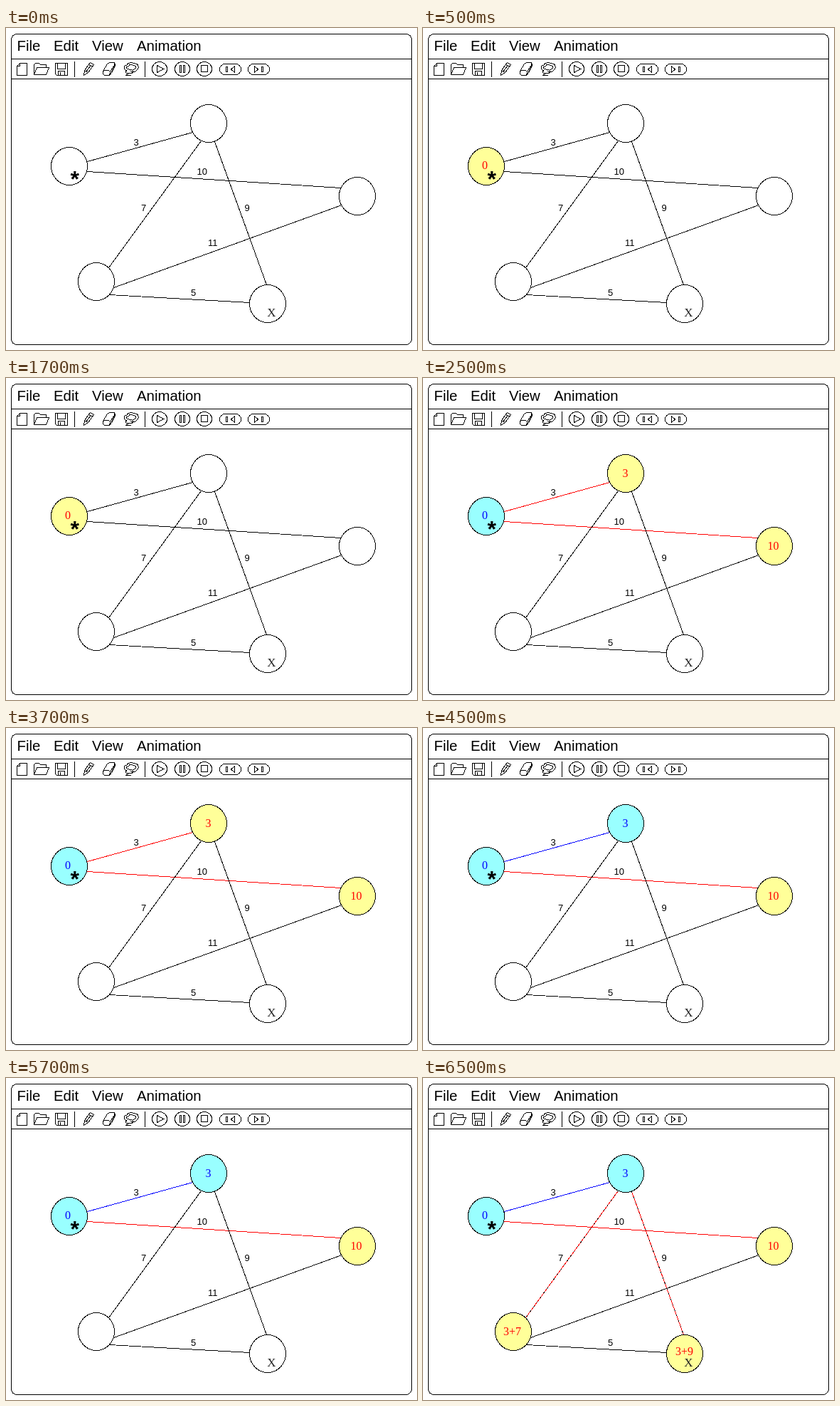
An HTML page for the animation above (8 s loop, 578 px wide and 452 px high).

```html
<!DOCTYPE html>
<html lang="en">
<head>
<meta charset="utf-8">
<title>Shortest path</title>
<style>
  html, body { margin: 0; width: 100%; height: 100%; overflow: hidden; background: #fff; }
  svg { display: block; }
  .art { fill: none; stroke: #000; stroke-width: 1; shape-rendering: crispEdges; }
  .menu { font: 20.4px "Liberation Sans", Arial, sans-serif; }
  .weight { font: 13px "Liberation Sans", Arial, sans-serif; }
  .label { font: 16px "Liberation Serif", "Times New Roman", serif; text-anchor: middle; }
  .goal { font-size: 17px; fill: #222; }
  .star { font: bold 32px "Liberation Sans", Arial, sans-serif; text-anchor: middle; }
</style>
</head>
<body>
<svg id="stage" width="578" height="452" viewBox="0 0 578 452">
  <g class="art">
    <rect x="7.5" y="8.5" width="563" height="436" rx="8"/>
    <path d="M8 43.5H570M8 71.5H570M96.5 47V69M195.5 47V69"/>
  </g>

  <g class="menu">
    <text x="15.5" y="32">File</text>
    <text x="67" y="32">Edit</text>
    <text x="121" y="32">View</text>
    <text x="184" y="32">Animation</text>
  </g>

  <g class="art">
    <!-- new, open, save -->
    <path d="M19.5 49.5H29.5V66.5H15.5V53.5ZV53.5H15.5"/>
    <path d="M39.5 65.5V51.5L41.5 49.5H46.5L48.5 51.5H56.5V55.5M39.5 65.5L43.5 55.5H60.5L56.5 65.5Z"/>
    <path d="M69.5 49.5H86.5V66.5H71.5L69.5 64.5ZM72.5 49.5V57.5H83.5V49.5M73.5 66.5V60.5H82.5V66.5M76 62V66"/>
    <!-- pencil, eraser, lasso -->
    <path d="M109.5 66.5L110.5 59.5L118.5 48.5L123.5 51.5L115.5 62.5ZM110.5 59.5L115.5 62.5M116.5 51.5L121.5 54.5M113 61L119 53M109.5 65L111.5 65.5"/>
    <path d="M136.5 60.5L142.5 50.5L145.5 48.5H152.5L153.5 52.5L148.5 62.5L145.5 66.5H138.5L136.5 64.5ZM136.5 60.5L138.5 59.5H144.5L146.5 61.5L153.5 50.5M146.5 61.5L145.5 66.5"/>
    <path d="M170 60C165 58 165 52 170 52C172 48 178 48 180 50C187 49 188 57 183 60C181 63 176 62 175 60M172 57.5C168 57 168 54 172 54C174 50 178 51 179 53C184 52 184 57 181 57.5C179 60 175 59 172 57.5M170 60C166 62 169 64 172 63C175 65 180 63 178 60M173 63L169 66.5H176"/>
    <!-- playback -->
    <ellipse cx="216" cy="57.5" rx="10.5" ry="10"/>
    <ellipse cx="248" cy="57.5" rx="10.5" ry="10"/>
    <ellipse cx="279" cy="57.5" rx="10.5" ry="10"/>
    <path d="M212.5 52.5V62.5L221.5 57.5Z"/>
    <path d="M244.5 52.5H246.5V62.5H244.5ZM249.5 52.5H251.5V62.5H249.5ZM274.5 52.5H283.5V61.5H274.5Z"/>
    <rect x="300.5" y="50.5" width="30" height="15" rx="7.5"/>
    <rect x="340.5" y="50.5" width="30" height="15" rx="7.5"/>
    <path d="M309.5 54.5H311.5V61.5H309.5ZM321.5 53.5V62.5L316.5 58ZM349.5 53.5V62.5L354.5 58ZM359.5 54.5H361.5V61.5H359.5Z"/>
  </g>

  <g id="edges" class="art"></g>
  <g id="nodes"></g>
  <text class="star" x="96.7" y="223">*</text>
  <text class="label goal" x="373.5" y="405">X</text>
</svg>
<script>
const LOOP = 8000;
const RED = "#f00", BLUE = "#00f", YELLOW = "#ff9", CYAN = "#9ff";

// open: when a node is first reached; done: when its distance is final
const nodes = [
  { x: 89, y: 194, label: "0", lx: 87, ly: 198, open: 500, done: 2500 },
  { x: 285, y: 134, label: "3", lx: 284.5, ly: 139, open: 2500, done: 4500 },
  { x: 494, y: 236, label: "10", lx: 492.5, ly: 241, open: 2500, done: Infinity },
  { x: 127, y: 356, label: "3+7", lx: 125.5, ly: 361, open: 6500, done: Infinity },
  { x: 368, y: 387, label: "3+9", lx: 367.5, ly: 389, open: 6500, done: Infinity }
];
const edges = [
  { line: [114, 187, 262, 146], weight: 3, wx: 179.5, wy: 165, open: 2500, done: 4500 },
  { line: [114, 201, 470, 224], weight: 10, wx: 268.5, wy: 206, open: 2500, done: Infinity },
  { line: [274, 158, 144, 336], weight: 7, wx: 190, wy: 257, open: 6500, done: Infinity, mixed: true },
  { line: [293, 159, 366, 360], weight: 9, wx: 335.5, wy: 257, open: 6500, done: Infinity, mixed: true },
  { line: [472, 248, 151, 364], weight: 11, wx: 284, wy: 306, open: Infinity, done: Infinity },
  { line: [145, 374, 342, 385], weight: 5, wx: 260, wy: 376, open: Infinity, done: Infinity }
];

function add(parent, tag, attrs, text = "") {
  const el = document.createElementNS("http://www.w3.org/2000/svg", tag);
  for (const key in attrs) el.setAttribute(key, attrs[key]);
  el.textContent = text;
  return parent.appendChild(el);
}

const edgeLayer = document.getElementById("edges");
const nodeLayer = document.getElementById("nodes");

for (const e of edges) {
  const [x1, y1, x2, y2] = e.line.map(v => v + 0.5);
  const place = { x1, y1, x2, y2 };
  e.el = add(edgeLayer, "line", place);
  if (e.mixed) add(edgeLayer, "line", { ...place, "stroke-dasharray": "2 6" });
  add(nodeLayer, "text", { x: e.wx, y: e.wy, class: "weight" }, e.weight);
}
for (const n of nodes) {
  n.el = add(nodeLayer, "ellipse", { cx: n.x, cy: n.y, rx: 25.5, ry: 26.5, class: "art" });
  n.text = add(nodeLayer, "text", { x: n.lx, y: n.ly, class: "label" }, n.label);
}

const pick = (item, t, idle, open, done) => t >= item.done ? done : t >= item.open ? open : idle;

function render(t) {
  for (const e of edges) e.el.setAttribute("stroke", pick(e, t, "#000", RED, BLUE));
  for (const n of nodes) {
    n.el.style.fill = pick(n, t, "#fff", YELLOW, CYAN);
    n.text.setAttribute("fill", pick(n, t, "none", RED, BLUE));
  }
}

const start = performance.now();
function tick() {
  render((performance.now() - start) % LOOP);
  requestAnimationFrame(tick);
}
tick();
</script>
</body>
</html>
```
